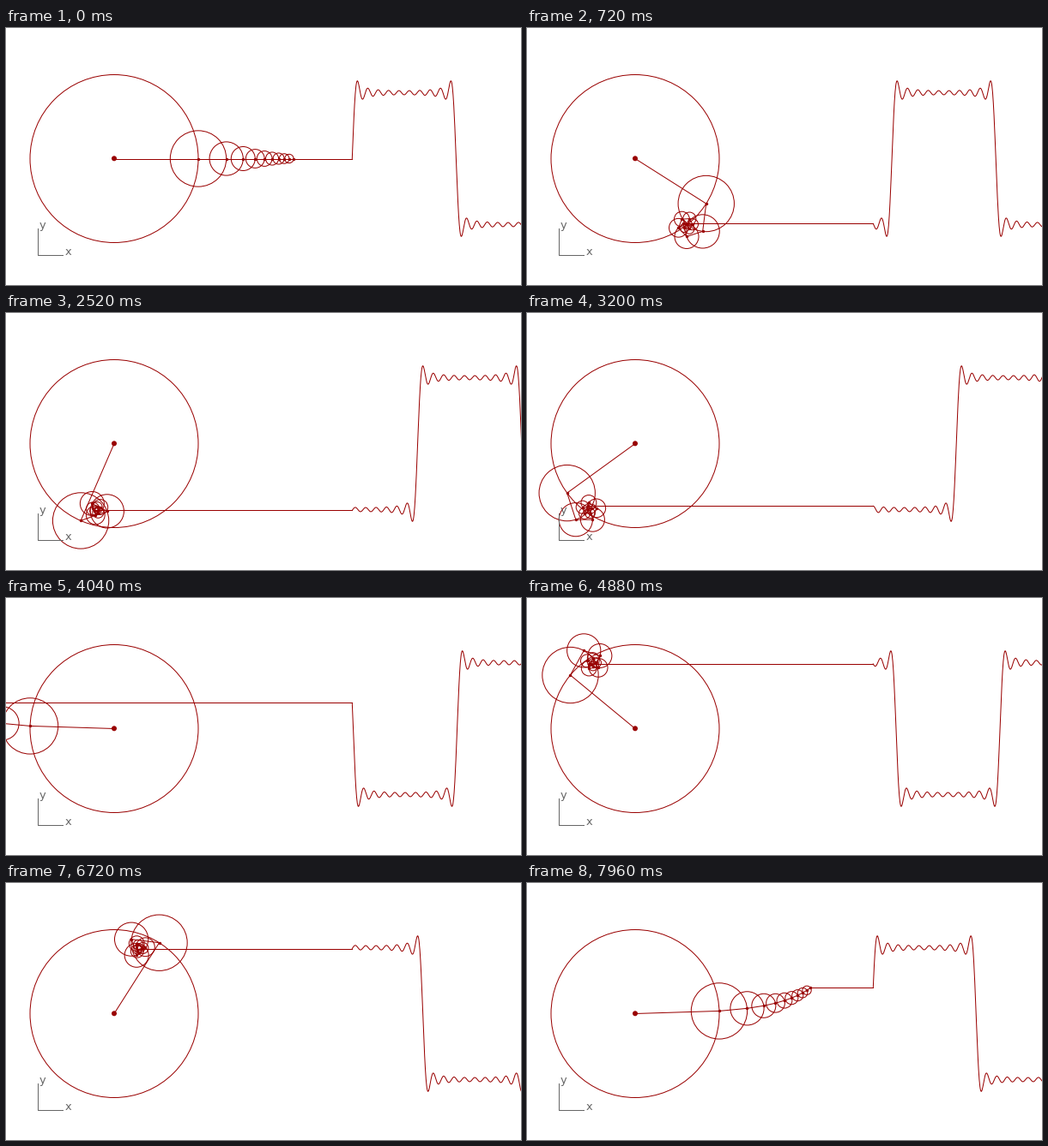
A matplotlib script that plays this animation: 600x300 px, repeating every 8000 ms.

```python
import numpy as np
import matplotlib.pyplot as plt
from matplotlib.animation import FuncAnimation
from matplotlib.patches import Circle

W, H, DPI = 600, 300, 100
FRAMES, STEP_MS = 200, 40
PX = 72 / DPI                      # points per pixel
RED, GRAY = "#990000", "#666666"

CX, CY, R = 126, 152.5, 98         # main circle
ORDERS = np.arange(1, 20, 2)       # odd harmonics of a square wave
WAVE_X, PERIOD = 403.3, 242.2      # start and wavelength of the trace

fig = plt.figure(figsize=(W / DPI, H / DPI), dpi=DPI, facecolor="white")
ax = fig.add_axes([0, 0, 1, 1])
ax.set_xlim(0, W)
ax.set_ylim(H, 0)
ax.axis("off")


def line(color=RED, **kw):
    return ax.plot([], [], color=color, lw=PX, solid_joinstyle="round", **kw)[0]


circles = [ax.add_patch(Circle((CX, CY), R / n, fill=False, ec=RED, lw=PX))
           for n in ORDERS]
arms, link, wave = line(), line(), line()
joints = ax.plot([], [], "o", color=RED, ms=3.4 * PX, mew=0)[0]
ax.add_patch(Circle((CX, CY - 0.2), 3, fc=RED, lw=0, zorder=3))

# Axis marker
line(GRAY, zorder=4).set_data([36.5, 36.5, 66], [234, 264.5, 264.5])
for name, x, y in (("y", 38.3, 234), ("x", 68.2, 265)):
    ax.text(x, y, name, color=GRAY, family="DejaVu Sans", size=13 * PX,
            ha="left", va="baseline", zorder=4)

trace_x = np.arange(WAVE_X, W + 2, 0.4)


def height(angle):
    return CY + R * (np.sin(np.outer(angle, ORDERS)) / ORDERS).sum(axis=1)


def draw(i):
    angle = 2 * np.pi * i / FRAMES
    x = CX + np.r_[0, np.cumsum(R / ORDERS * np.cos(ORDERS * angle))]
    y = CY + np.r_[0, np.cumsum(R / ORDERS * np.sin(ORDERS * angle))]
    for circle, cx, cy in zip(circles, x, y):
        circle.center = cx, cy
    arms.set_data(x, y)
    joints.set_data(x[1:], y[1:])
    link.set_data([x[-1], WAVE_X], [y[-1], y[-1]])
    wave.set_data(trace_x, height(angle - 2 * np.pi * (trace_x - WAVE_X) / PERIOD))
    return [*circles, arms, joints, link, wave]


anim = FuncAnimation(fig, draw, frames=FRAMES, interval=STEP_MS,
                     repeat=True, repeat_delay=0, blit=False)
plt.show()
```
